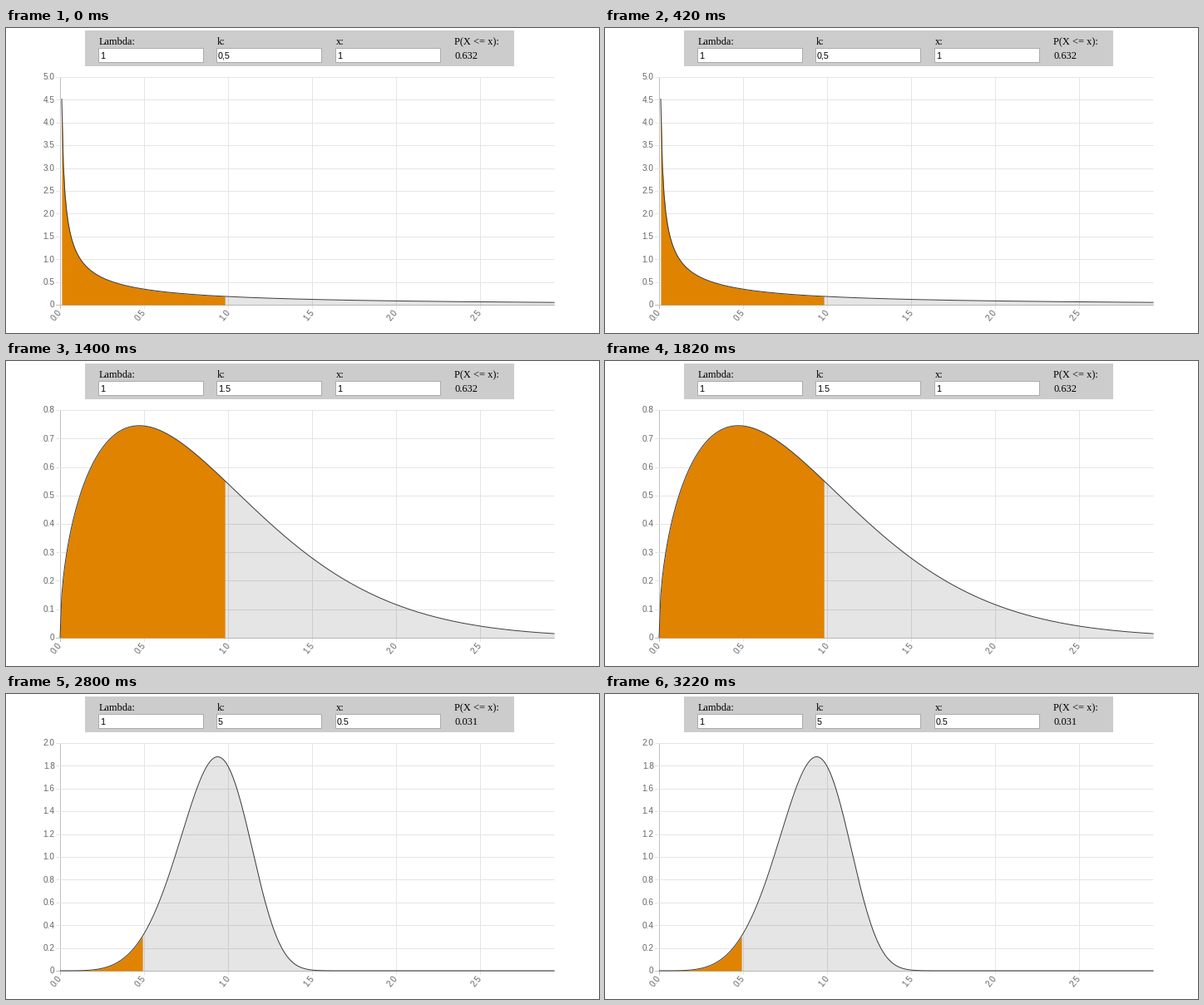
Recreate the animation shown at these times as a matplotlib script. Size 713 by 367 pixels, loop 3.5 s.

```python
import numpy as np
import matplotlib.pyplot as plt
from matplotlib.animation import ArtistAnimation
from matplotlib.patches import Rectangle

W, H, DPI = 713, 367, 100
LEFT, RIGHT, TOP, BASE = 65, 659.5, 59, 333
UNIT = (RIGHT - LEFT) / 3      # pixels per unit of x on the curve
TICK_GAP = 101                 # pixels between x labels
ORANGE, LINE, GRID, AXIS = "#e08300", "#3c3c3c", "#e5e5e5", "#bfbfbf"

# k, k as typed, x, x as typed, highest y label, y label step
STATES = [
    (0.5, "0,5", 1.0, "1", 5.0, 0.5),
    (1.0, "1", 1.0, "1", 1.0, 0.1),
    (1.5, "1.5", 1.0, "1", 0.8, 0.1),
    (5.0, "5", 1.0, "1", 2.0, 0.2),
    (5.0, "5", 0.5, "0.5", 2.0, 0.2),
]

fig = plt.figure(figsize=(W / DPI, H / DPI), dpi=DPI, facecolor="white")
ax = fig.add_axes([0, 0, 1, 1])
ax.set_xlim(0, W)
ax.set_ylim(H, 0)
ax.axis("off")


def px(size):
    return size * 72 / DPI


def label(x, y, text, size=12.4, font="Liberation Serif", color="black", **kw):
    kw.setdefault("va", "baseline")
    return ax.text(x, y, text, fontsize=px(size), family=font, color=color,
                   zorder=6, **kw)


def sans(x, y, text, size=10.8, **kw):
    return label(x, y, text, size, "Liberation Sans", **kw)


def rule(x0, y0, x1, y1, color=GRID):
    # Half-pixel coordinates are already crisp, so snapping is off.
    return ax.plot([x0, x1], [y0, y1], color=color, lw=px(1), zorder=1,
                   solid_capstyle="butt", snap=False)[0]


def weibull(x, k):
    return k * x ** (k - 1) * np.exp(-x ** k)


def draw_form():
    ax.add_patch(Rectangle((95, 3), 516, 43, fc="#cccccc", ec="none"))
    for x, name in ((111, "Lambda:"), (253, "k:"), (396, "x:")):
        ax.add_patch(Rectangle((x + 0.5, 24.5), 126, 17, fc="white",
                               ec="#ababab", lw=px(1), zorder=2, snap=False))
        label(x + 1, 20, name)
    label(539, 20, "P(X <= x):")
    sans(113, 37, "1")


def draw_x_axis():
    for i in range(6):
        x = LEFT + 0.5 + TICK_GAP * i
        rule(x, TOP, x, BASE + 5, GRID if i else AXIS)
        sans(x - 4.5, 345.7, f"{i / 2:.1f}", 10, color="#666666", rotation=50,
             ha="center", va="center")
    rule(LEFT - 5, BASE + 0.5, RIGHT, BASE + 0.5, AXIS)


def scene(k, k_text, x, x_text, y_max, step):
    parts = [sans(255, 37, k_text), sans(398, 37, x_text),
             label(539, 37, f"{1 - np.exp(-x ** k):.3f}")]

    steps = round(y_max / step)
    for i in range(steps + 1):
        y = BASE - (BASE - TOP) * i / steps
        text = f"{i * step:.1f}" if i else "0"
        parts.append(sans(58.7, y + 3.3, text, 10, color="#666666", ha="right"))
        if i:
            row = round(y) + 0.5
            parts.append(rule(LEFT - 5, row, RIGHT, row))

    xs = np.arange(1 if k < 1 else 0, 301) / 100
    cx = LEFT + UNIT * xs
    cy = BASE - (BASE - TOP) * weibull(xs, k) / y_max
    inside = xs <= x
    parts.append(ax.fill_between(cx, cy, BASE, color="black", alpha=0.1,
                                 lw=0, zorder=3))
    parts.append(ax.fill_between(cx[inside], cy[inside], BASE, color=ORANGE,
                                 lw=0, zorder=4))
    parts += ax.plot(cx, cy, color=LINE, lw=px(1), zorder=5, snap=False,
                     solid_capstyle="butt")
    return parts


draw_form()
draw_x_axis()
anim = ArtistAnimation(fig, [scene(*s) for s in STATES], interval=700,
                       repeat=True, repeat_delay=0, blit=False)
plt.show()
```
